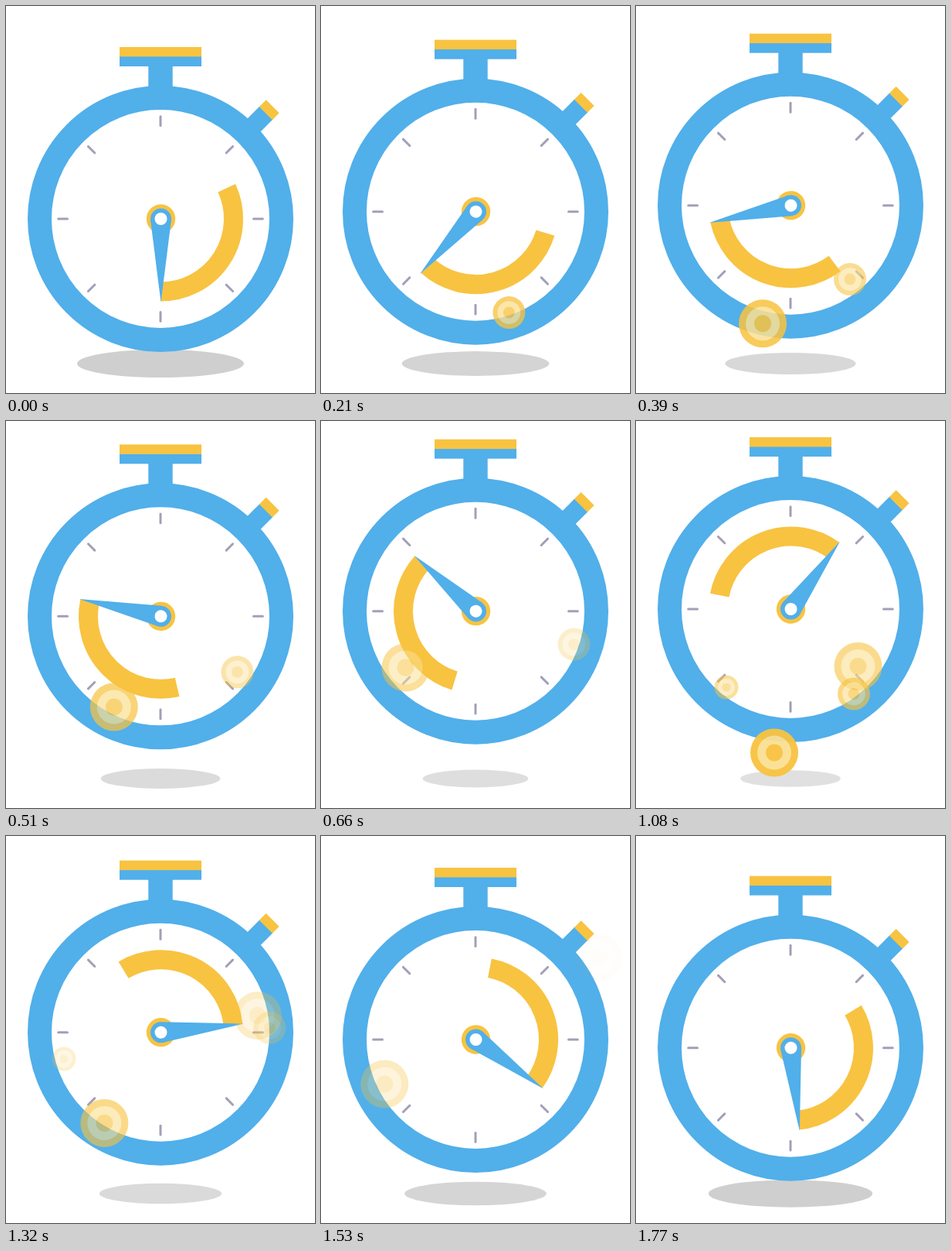
An HTML page that plays this animation: 400x500 px, repeating every 1.8 s.

```html
<!DOCTYPE html>
<html lang="en">
<head>
<meta charset="utf-8">
<title>Stopwatch</title>
<style>
  html, body { margin: 0; width: 100%; height: 100%; overflow: hidden; background: #fff; }
  svg { display: block; width: 100vw; height: 100vh; }
  .blue { fill: #51afea; }
  .gold { fill: #f8c341; }
  .white { fill: #fff; }
</style>
</head>
<body>
<svg viewBox="0 0 400 500">
  <defs>
    <g id="coin">
      <circle class="gold" r="31"/>
      <circle r="22" fill="#fbe093"/>
      <circle class="gold" r="11"/>
    </g>
  </defs>
  <ellipse id="shadow" cx="200" cy="462"/>
  <g id="watch">
    <rect class="blue" x="-15.7" y="-200" width="31.4" height="40"/>
    <rect class="blue" x="-53" y="-210" width="106" height="13"/>
    <rect class="gold" x="-53" y="-222" width="106" height="12.4"/>
    <g transform="rotate(45)">
      <rect class="blue" x="-12" y="-194" width="24" height="32"/>
      <rect class="gold" x="-12" y="-205.3" width="24" height="12.5"/>
    </g>
    <circle r="156.5" fill="#fff" stroke="#51afea" stroke-width="31"/>
    <g id="ticks" stroke="#a39fb8" stroke-width="3" stroke-linecap="round"/>
    <g transform="translate(.5 0)">
      <g id="hand">
        <path id="trail" fill="none" stroke="#f8c341" stroke-width="25"/>
        <circle class="gold" r="18.7"/>
        <circle class="blue" r="13.5"/>
        <path class="blue" d="M-13.4 1.7L0 108L13.4 1.7Z"/>
        <circle class="white" r="8"/>
      </g>
    </g>
  </g>
  <g id="coins"></g>
</svg>
<script>
const LOOP = 1800, STEP = 30, HALF = LOOP / 2;
const $ = id => document.getElementById(id);

function add(parent, tag, attrs) {
  const el = document.createElementNS('http://www.w3.org/2000/svg', tag);
  for (const key in attrs) el.setAttribute(key, attrs[key]);
  parent.appendChild(el);
  return el;
}

for (let a = 0; a < 360; a += 45) {
  add($('ticks'), 'line', { y1: -132.3, y2: -120.5, transform: `rotate(${a})` });
}

// The trail follows the hand by 115 degrees.
const R = 94, span = 115 * Math.PI / 180;
$('trail').setAttribute('d',
  `M0 ${R}A${R} ${R} 0 0 0 ${R * Math.sin(span)} ${R * Math.cos(span)}`);

// Each coin passes (x, y) at time `at` with velocity (vx, vy) in px/ms,
// appears at `start` and fades out until `end`.
const coins = [
  { r: 31, at: 660, x: 109.5, y: 318.5, vx: -.202, vy: -.340, start: 280, end: 1080 },
  { r: 21, at: 660, x: 327.5, y: 288.5, vx: .187, vy: -.239, start: 10, end: 900 },
  { r: 15.5, at: 1080, x: 117, y: 344, vx: -.175, vy: -.233, start: 680, end: 1520 },
  { r: 31, at: 1080, x: 287.5, y: 317, vx: .160, vy: -.354, start: 760, end: 1550 },
  { r: 21, at: 1080, x: 282, y: 352.5, vx: .247, vy: -.436, start: 865, end: 1470 },
  { r: 31, at: 1080, x: 179, y: 428.5, vx: -.215, vy: -.240, start: 1050, end: 1760 }
];
for (const coin of coins) coin.el = add($('coins'), 'use', { href: '#coin' });

function draw(t) {
  const lift = 1 - Math.abs(t - HALF) / HALF;
  $('watch').setAttribute('transform', `translate(200 ${275 - 40 * lift})`);
  $('hand').setAttribute('transform', `rotate(${t / LOOP * 360})`);

  const size = 1 - lift / 2;
  $('shadow').setAttribute('rx', 108 * size);
  $('shadow').setAttribute('ry', 18 * size);
  $('shadow').setAttribute('fill-opacity', .19 - .085 * lift);

  for (const c of coins) {
    const visible = t >= c.start && t < c.end;
    const dt = t - c.at;
    c.el.setAttribute('opacity', visible ? (c.end - t) / (c.end - c.start) : 0);
    c.el.setAttribute('transform',
      `translate(${c.x + c.vx * dt} ${c.y + c.vy * dt}) scale(${c.r / 31})`);
  }
}

const origin = performance.now();
function tick() {
  const t = (performance.now() - origin) % LOOP;
  draw(Math.floor(t / STEP) * STEP);
  requestAnimationFrame(tick);
}
tick();
</script>
</body>
</html>
```
